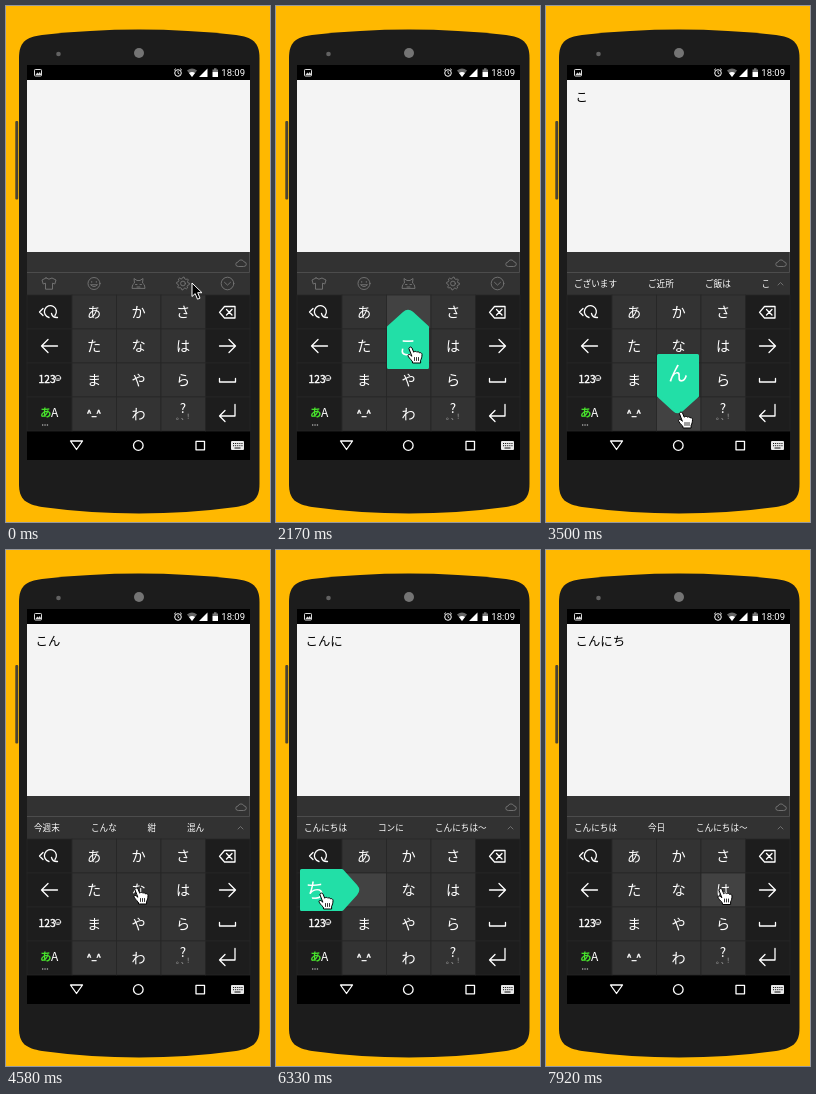
These frames come from a looping animation (264x516 px, 8000 ms). An HTML page:

```html
<!DOCTYPE html>
<html lang="ja">
<head>
<meta charset="utf-8">
<title>Flick typing</title>
<style>
html, body { margin: 0; width: 100%; height: 100%; overflow: hidden; background: #ffb800; }
svg { display: block; width: 264px; height: 516px; }
text { font-family: "Noto Sans CJK JP", "Noto Sans", sans-serif; fill: #fff; }
.mid { text-anchor: middle; }
.time { font: 400 9.5px Roboto, sans-serif; }
.heavy { stroke: #fff; stroke-width: .4; }
.line { fill: none; stroke: #fff; stroke-width: 1.3; stroke-linecap: round; stroke-linejoin: round; }
.dim { fill: none; stroke: #777; stroke-width: .9; stroke-linejoin: round; stroke-linecap: round; }
</style>
</head>
<body>
<svg id="stage" viewBox="0 0 264 516">
  <!-- phone -->
  <rect x="9.300" y="115" width="2.900" height="78.500" rx="1" fill="#4a4433"/>
  <path d="M13 52C13 36 20 31 36 29Q84 23.500 133 23.500T230 29C246 31 253.500 36 253.500 52V478C253.500 494 246 498 230 501Q182 507.500 133 507.500T36 501C20 498 13 494 13 478Z" fill="#1c1c1c"/>
  <circle cx="52.500" cy="48" r="2.300" fill="#626262"/>
  <circle cx="133" cy="47" r="5" fill="#747474"/>
  <rect x="21" y="59" width="223" height="395" fill="#000"/>
  <rect x="21" y="74" width="223" height="172" fill="#f4f4f4"/>
  <rect x="21" y="246" width="223" height="179" fill="#323232"/>
  <path d="M21 266.500H243.500V246" fill="none" stroke="#4c4c4c"/>
  <path class="dim" d="M232 260.500a2.200 2.200 0 0 1 0-4.400a3.200 3.200 0 0 1 6-.2a2.300 2.300 0 0 1 0 4.600z"/>

  <!-- status bar -->
  <rect x="28.500" y="63.500" width="7" height="6.500" rx=".8" fill="none" stroke="#ddd"/>
  <path d="M29.500 69l1.800-2.400 1.200 1.200 1.300-1.800 1.700 3z" fill="#ddd"/>
  <g fill="none" stroke="#fff"><circle cx="172" cy="67" r="3.300"/><path d="M172 65v2.200l1.500 1M168 64.300l2-1.800M176 64.300l-2-1.800" stroke-width=".8"/></g>
  <path d="M181 64.500Q186 60.500 191 64.500L186 71z" fill="#666"/>
  <path d="M183 67Q186 65 189 67L186 71z" fill="#fff"/>
  <path d="M193 71h8.500v-8.500z" fill="#fff"/>
  <path d="M206.500 63.500h1.500v-1.200h2.500v1.200h1.500v2.500h-5.500z" fill="#777"/>
  <path d="M206.500 66h5.500v5h-5.500z" fill="#fff"/>
  <text class="time" x="239" y="70" text-anchor="end">18:09</text>

  <text id="typed" x="29.500" y="95.500" font-size="12.400" style="fill:#000"></text>

  <g id="tools" class="dim">
    <path d="M40 272l-4 2 1.200 4 2.300-.8v6h7v-6l2.300.8 1.200-4-4-2q-3 2.500-6 0z"/>
    <circle cx="88" cy="277.500" r="6"/><path d="M85.700 275.500v.8M90.300 275.500v.8M84.800 279q3.200 3.400 6.400 0z"/>
    <path d="M126 282q0-4 2.500-5l-.5-4.500 3 2h3l3-2-.5 4.500q2.500 1 2.500 5zM129.500 278.500h1.500M134 278.500h1.500M131 281h3"/>
    <circle cx="177" cy="277.500" r="2.400"/>
    <path id="gear"/>
    <circle cx="221.500" cy="277.500" r="6.300"/><path d="M218.500 276.300l3 2.800 3-2.800"/>
  </g>
  <g id="words"></g>
  <g id="keys"></g>

  <!-- side keys -->
  <g class="line">
    <path d="M37 302.500l-3.500 3.500 3.500 3.500M43 311.500A6 6 0 1 1 49 309.500M45.500 307.500q1 4.300 6 4"/>
    <path d="M51.500 340h-16M42 333.500l-6.500 6.500 6.500 6.500"/>
    <path d="M213.500 340h16M223 333.500l6.500 6.500-6.500 6.500"/>
    <path d="M218.500 300.500h10.500v11.500h-10.500l-5-5.700zM220.500 303.500l5.500 5.500M226 303.500l-5.500 5.500"/>
    <path d="M213.500 372.500v3.500h16v-3.500"/>
    <path d="M229 398.500v11.500h-15.500M219 404.500l-5.500 5.500 5.500 5.500"/>
    <g stroke-width=".8"><circle cx="52" cy="372" r="2.700"/><path d="M50.800 372.700q1.200 1.400 2.400 0"/></g>
  </g>
  <text class="heavy" x="32.500" y="377" font-size="10.300">123</text>
  <text x="34" y="411" font-size="11.500" font-weight="700" style="fill:#48e22c">あ</text>
  <text x="45" y="411" font-size="12">A</text>
  <path d="M36 419h1.300M38.400 419h1.300M40.800 419h1.300" stroke="#ddd" stroke-width="1.200"/>

  <!-- navigation bar -->
  <g class="line">
    <path d="M64.500 435h12l-6 8.500z"/>
    <circle cx="132.300" cy="439.500" r="4.800"/>
    <path d="M190 435.300h8.500v8.500h-8.500z"/>
  </g>
  <rect x="225" y="435" width="13" height="9" rx="1" fill="#e8e8e8"/>
  <path d="M227 437.500h9.500M227 439.700h9.500" stroke="#111" stroke-dasharray="1.100 1"/>
  <path d="M228.500 442h6" stroke="#111"/>

  <g id="popup">
    <path d="M-19.500 18L-4 4Q0 .5 4 4L19.500 18V58.500H-19.500z" fill="#22dfa7" stroke="#22dfa7" stroke-width="3" stroke-linejoin="round"/>
    <text class="mid" font-size="20" font-weight="300"></text>
  </g>
  <path id="arrow" d="M0 0V13.500L3.200 10.600 5.500 16.200 8 15.200 5.700 9.700H10z" fill="#000" stroke="#fff"/>
  <g id="hand" stroke="#000" stroke-linejoin="round" stroke-linecap="round">
    <path fill="#fff" d="M-3 1.200C-2.600-.3-.8-.4 0 1L1.700 5.200C2.300 4.200 4.300 4 4.800 5.200C5.600 4.400 7.200 4.800 7.500 5.900C8.600 5.300 10 6 10 7.500C10 10 9.400 12 8.600 13.200V16H.6L.2 14C-1.600 12.400-3.600 10-4 8.700C-4.200 7.200-2.400 7-1.200 8.300L-.4 9z"/>
    <path fill="none" stroke-width=".8" d="M2.500 10.500v3M4.500 10.500v3M6.500 10.500v3"/>
  </g>
</svg>
<script>
const $ = id => document.getElementById(id);

const LOOP = 8000, STEP = 1000 / 12;
const colX = [21, 66, 110.5, 155, 199.5, 244];
const rowY = r => 289 + r * 34;
const labels = ['あかさ', 'たなは', 'まやら', ' わ '];

const gearPoint = i => {
  const a = i * Math.PI / 16, r = i % 4 < 2 ? 6.4 : 4.9;
  return (177 + r * Math.cos(a)).toFixed(1) + ' ' + (277.5 + r * Math.sin(a)).toFixed(1);
};
$('gear').setAttribute('d', 'M' + Array.from({ length: 32 }, (_, i) => gearPoint(i)).join('L') + 'Z');

// Keyboard
let html = '';
for (let r = 0; r < 4; r++) {
  for (let c = 0; c < 5; c++) {
    const x = colX[c], y = rowY(r), side = c % 4 === 0;
    html += `<rect id="bg${r}${c}" x="${x}" y="${y}" width="${colX[c + 1] - x}" height="34"
      fill="${side ? '#1d1d1d' : '#333'}" stroke="#272727" stroke-width=".8"/>`;
    if (!side) html += `<text id="lb${r}${c}" class="mid" x="${x + 22.2}" y="${y + 21.6}" font-size="14.2">${labels[r][c - 1]}</text>`;
  }
}
html += `<text class="mid heavy" x="88" y="409.500" font-size="8.200" font-weight="700">^_^</text>
  <text class="mid" x="177" y="406.500" font-size="13.500" font-weight="300">?</text>
  <text x="170" y="413" font-size="7" style="fill:#bbb">。</text>
  <text x="175" y="413" font-size="7" style="fill:#bbb">、</text>
  <text x="181" y="413" font-size="7" style="fill:#bbb">!</text>`;
$('keys').innerHTML = html;

// Time, typed text, suggestions with their x
const states = [
  [0, '', []],
  [2330, 'こ', [28, 'ございます', 102, 'ご近所', 159, 'ご飯は', 215.5, 'こ']],
  [4160, 'こん', [28, '今週末', 85, 'こんな', 141.5, '紺', 181, '混ん']],
  [5080, 'こんに', [28, 'こんにちは', 102, 'コンに', 159, 'こんにちは〜']],
  [6410, 'こんにち', [28, 'こんにちは', 102, '今日', 150, 'こんにちは〜']]
];

// Press, flick, release, key, letter, flick direction
const presses = [
  [1410, 1490, 2330, '02', 'こ', 'down'],
  [3240, 3410, 4160, '32', 'ん', 'up'],
  [4660, 4830, 5080, '12', 'に', 'left'],
  [5740, 5910, 6410, '11', 'ち', 'left'],
  [7330, 9000, 9000, '13', '', '']
];

// Angle of the bubble, its tip and its letter relative to the key's middle
const flicks = {
  down: { turn: 0, tip: [0, -3], letter: [0, 35] },
  up: { turn: 180, tip: [0, 0], letter: [0, -41] },
  left: { turn: 90, tip: [-3.5, 0], letter: [-48, 0] }
};
const keyMid = key => [colX[+key[1]] + 21.5, rowY(+key[0]) + 17];

// Pointer way: time, x, y
const way = [
  [0, 186, 277], [830, 133, 306], [1000, 133, 310], [1170, 133, 310], [1250, 131, 304],
  [1420, 131, 304], [1500, 136, 341], [2500, 136, 341], [3080, 137, 410], [3250, 137, 410],
  [3500, 136.5, 406], [3750, 137, 380], [4170, 137, 380], [4500, 132, 338], [4670, 132, 338],
  [4830, 107, 342], [5330, 107, 342], [5500, 82, 343], [5750, 82, 343], [5920, 47, 343],
  [6420, 47, 343], [7000, 177, 340], [7580, 177, 340], [7750, 176, 338.5], [8000, 176, 338.5]
];
const ease = p => p * p * (3 - 2 * p);

function pointerAt(t) {
  const i = way.findIndex(w => w[0] > t), [t0, x0, y0] = way[i - 1], [t1, x1, y1] = way[i];
  const p = ease((t - t0) / (t1 - t0));
  return [x0 + (x1 - x0) * p, y0 + (y1 - y0) * p];
}

const show = (el, on) => el.setAttribute('visibility', on ? 'visible' : 'hidden');
const [bubble, letterText] = $('popup').children;
let shown;

function showState(s) {
  if (s === shown) return;
  shown = s;
  const [, text, words] = s;
  $('typed').textContent = text;
  show($('tools'), !text);
  let out = '';
  for (let i = 0; i < words.length; i += 2)
    out += `<text x="${words[i]}" y="280.800" font-size="8.600">${words[i + 1]}</text>`;
  if (text) out += '<path class="dim" d="M232 279l2.500-2.500 2.500 2.500"/>';
  $('words').innerHTML = out;
}

function showPopup(key, letter, { turn, tip, letter: [lx, ly] }) {
  const [x, y] = keyMid(key);
  bubble.setAttribute('transform', `translate(${x + tip[0]} ${y + tip[1]}) rotate(${turn})`);
  letterText.setAttribute('x', x + lx);
  letterText.setAttribute('y', y + ly + 7.5);
  letterText.textContent = letter;
  show($('popup'), true);
}

function showPress(t) {
  show($('popup'), false);
  for (const [down, flick, up, key, letter, dir] of presses) {
    const held = t >= down && t < up, flicked = t >= flick && t < up;
    $('bg' + key).setAttribute('fill', held ? '#424242' : '#333');
    show($('lb' + key), !flicked);
    if (flicked) showPopup(key, letter, flicks[dir]);
  }
}

function draw(now) {
  const t = Math.floor((now % LOOP + 4) / STEP) * STEP % LOOP;
  showState(states.filter(s => s[0] <= t).pop());
  showPress(t);
  const [x, y] = pointerAt(t), arrow = t < 410;
  for (const id of ['arrow', 'hand']) $(id).setAttribute('transform', `translate(${x.toFixed(1)} ${y.toFixed(1)})`);
  show($('arrow'), arrow);
  show($('hand'), !arrow);
}

const start = performance.now();
(function tick() {
  draw(performance.now() - start);
  requestAnimationFrame(tick);
})();
</script>
</body>
</html>
```
